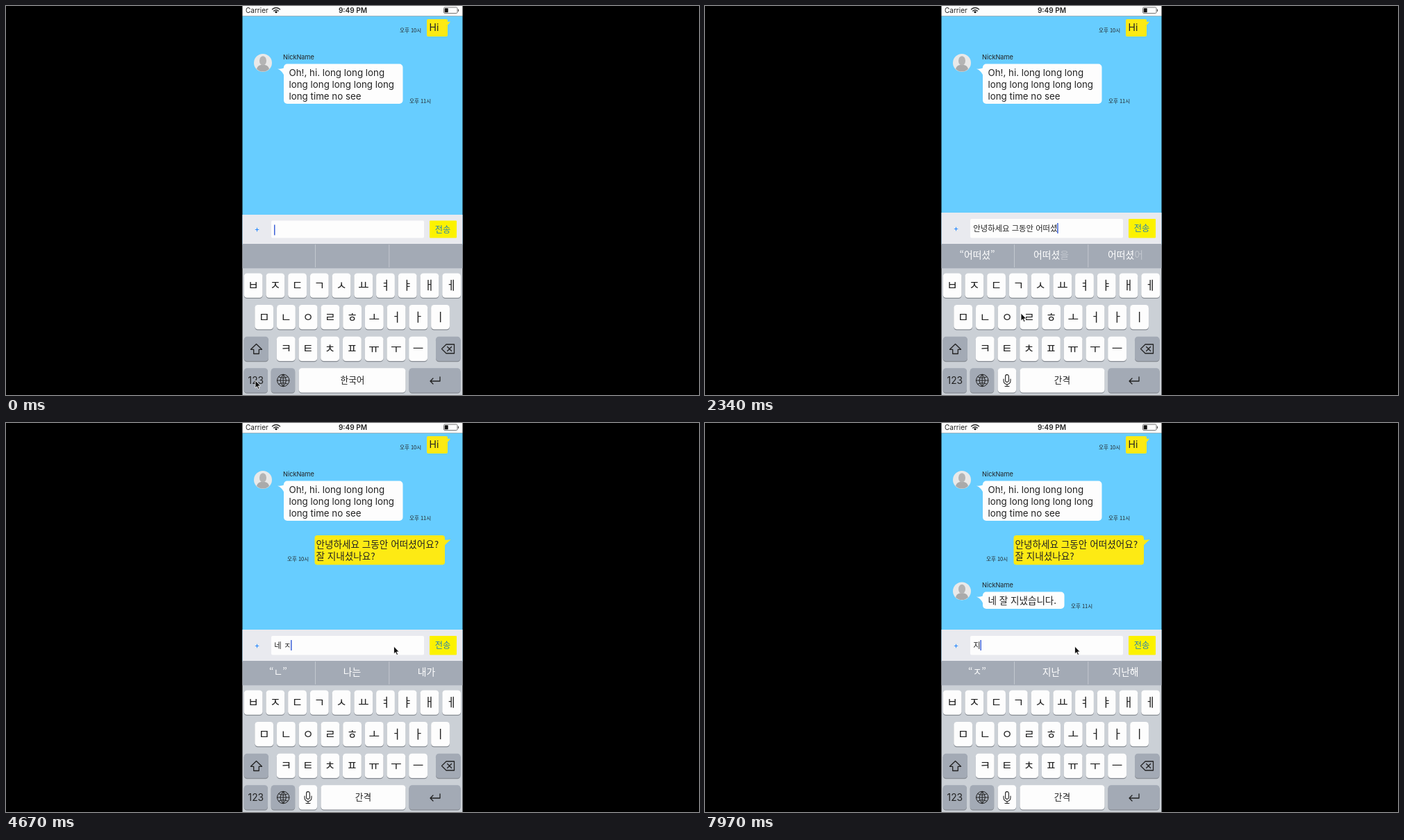
Write an HTML page that moves like this. It is 998x561 px and loops after 8 s.

```html
<!DOCTYPE html>
<html lang="ko">
<head>
<meta charset="utf-8">
<title>Chat</title>
<style>
  html, body { margin: 0; width: 100%; height: 100%; overflow: hidden; background: #000; }
  svg { display: block; width: 998px; height: 561px; }
  text { font-family: Inter, 'Noto Sans CJK KR', 'Noto Sans CJK', sans-serif; white-space: pre; fill: #222; }
  .ko { font-family: 'Noto Sans CJK KR', 'Noto Sans CJK', 'Noto Sans CJK SC', sans-serif; }
  .mid { text-anchor: middle; }
  .line { fill: none; stroke: #222; stroke-width: 1.3; stroke-linejoin: round; stroke-linecap: round; }
</style>
</head>
<body>
<svg id="stage" viewBox="0 0 998 561"></svg>
<script>
const LOOP = 8000;
const WHITE = '#fdfdfd', YELLOW = '#fdea14', DARK_KEY = '#a3aab5';
const stage = document.getElementById('stage');

// Markup helpers
const rect = (x, y, w, h, fill, r = 0, extra = '') =>
  `<rect x="${x}" y="${y}" width="${w}" height="${h}" rx="${r}" fill="${fill}" ${extra}/>`;
const label = (x, y, size, str, cls = '', extra = '') =>
  `<text x="${x}" y="${y}" font-size="${size}" class="${cls}" ${extra}>${str}</text>`;
const path = (d, extra = '') => `<path d="${d}" ${extra}/>`;
const line = (d, extra = '') => path(d, `class="line" ${extra}`);
const key = (x, y, w, fill = WHITE, id = '') =>
  rect(x, y + 1, w, 35.5, '#878c93', 4.5, id && `id="${id}Shadow"`) +
  rect(x, y, w, 35.3, fill, 4.5, id && `id="${id}"`);
const keyRow = (chars, x, y) => [...chars].map((c, i) =>
  key(x + i * 31.73, y, 26.8) + label(x + i * 31.73 + 13.4, y + 23.5, 17, c, 'ko mid')).join('');

const avatar = y => `<g transform="translate(370 ${y})">
  <circle r="13" fill="#e9e9e9"/>
  <path d="M-9 9Q-8 4-3 3L3 3Q8 4 9 9A13 13 0 0 1-9 9Z" fill="#aaa"/>
  <ellipse cy="-3" rx="5" ry="6.8" fill="#b4b4b4"/></g>`;
const whiteBubble = (y, w, h) => rect(400, y, w, h, WHITE, 5) +
  path(`M391 ${y + 7}Q396 ${y + 8} 401 ${y + 5.5}V${y + 18}Q398 ${y + 10} 391 ${y + 7}Z`, `fill="${WHITE}"`);
const sender = y => avatar(y) + label(399, y - 5.5, 9.2, 'NickName');

const statusBar = rect(340.5, 0, 317, 14.5, WHITE) +
  label(345, 10, 10, 'Carrier') +
  label(499.5, 10, 10.1, '9:49 PM', 'mid', 'font-weight="600"') +
  line('M383.5 4.8Q389 .2 394.5 4.8M385.7 7.1Q389 4.4 392.3 7.1', 'stroke-width="1.8"') +
  path('M386.9 8.4Q389 6.8 391.1 8.4L389 10.6Z') +
  rect(630.5, 2, 19.5, 8.5, 'none', 1.5, 'stroke="#555" stroke-width=".8"') +
  rect(631.7, 3.2, 5, 6.1, '#111', .5) + rect(650.9, 4.7, 1.2, 3.2, '#555');

const chat = rect(340.5, 14.5, 317, 330, '#67cdff') +
  rect(606, 19, 30, 25, YELLOW, 2) + path('M635 23L640 22.5Q638 26 635 28Z', `fill="${YELLOW}"`) +
  label(609.5, 36.3, 14, 'Hi') + label(567, 37.8, 7.5, '오후 10시', 'ko') +
  sender(82) + whiteBubble(83.5, 171.5, 57.5) +
  ['Oh!, hi. long long long', 'long long long long long', 'long time no see']
    .map((s, i) => label(407.5, 100.8 + i * 17.2, 13.35, s)).join('') +
  label(581, 140.3, 7.5, '오후 11시', 'ko') +
  `<g id="sentBubble">${rect(444.5, 162, 187.5, 42.5, YELLOW, 4)}
    ${path('M631 168.5Q636 169 640.5 168Q636 172 631 177Z', `fill="${YELLOW}"`)}
    ${label(446.5, 179.5, 13.6, '안녕하세요 그동안 어떠셨어요?', 'ko')}
    ${label(446.5, 196.7, 13.6, '잘 지내셨나요?', 'ko')}
    ${label(405, 198.7, 7.5, '오후 10시', 'ko')}</g>
  <g id="replyBubble">${sender(242.5)}${whiteBubble(243.5, 117.5, 24.5)}
    ${label(407.5, 260.5, 13.55, '네 잘 지냈습니다.', 'ko')}
    ${label(527, 266.7, 7.5, '오후 11시', 'ko')}</g>`;

const inputBar = rect(340.5, 298, 317, 46, '#e9eaef', 0, 'id="panel"') +
  rect(382, 307, 220, 27.5, WHITE, 2, 'id="field"') +
  rect(610, 307, 39, 27.5, '#fcf200', 1, 'id="send"') +
  label(361.5, 325, 11.5, '+', 'mid', 'id="plus" style="fill:#1680ff"') +
  label(629, 325, 12.2, '전송', 'ko mid', 'id="sendLabel" style="fill:#247fb4"') +
  label(386.3, 0, 11.35, '', 'ko', 'id="line0"') + label(386.3, 0, 11.35, '', 'ko', 'id="line1"') +
  rect(386, 0, 1.5, 15, '#3e62d8', 0, 'id="caret"');

const keyboard = rect(340.5, 343, 317, 218, '#cbd0d6') + rect(340.5, 343, 317, 35.3, DARK_KEY) +
  rect(445, 344, 1, 33, '#c3c8cf') + rect(551.3, 344, 1, 33, '#c3c8cf') +
  [392, 498.5, 605.5].map((x, i) => label(x, 364, 13.8, '', 'ko mid', `id="hint${i}" style="fill:#fff"`)).join('') +
  keyRow('ㅂㅈㄷㄱㅅㅛㅕㅑㅐㅔ', 342.7, 385.5) +
  keyRow('ㅁㄴㅇㄹㅎㅗㅓㅏㅣ', 358.3, 431) +
  keyRow('ㅋㅌㅊㅍㅠㅜㅡ', 389.8, 476.7) +
  key(342.7, 476.7, 35.3, DARK_KEY) + line('M360.5 487.5L368.5 495.3H364.3V501.5H356.7V495.3H352.5Z') +
  key(619, 476.7, 35.5, DARK_KEY) +
  line('M634 488H645.5V501H634L627.5 494.5ZM635.6 491.5L641.6 497.5M641.6 491.5L635.6 497.5') +
  key(342.7, 522.3, 34.3, DARK_KEY) + label(359.8, 545.3, 13.8, '123', 'mid') +
  key(381.7, 522.3, 34.5, DARK_KEY) +
  line('M390.5 540A8.7 8.7 0 1 1 407.9 540A8.7 8.7 0 1 1 390.5 540ZM399.2 531.3V548.7M390.5 540H407.9' +
    'M399.2 531.3Q390.7 540 399.2 548.7Q407.7 540 399.2 531.3M392.7 534.8Q399.2 538 405.7 534.8M392.7 545.2Q399.2 542 405.7 545.2',
    'style="stroke-width:1"') +
  `<g id="mic">${key(421.7, 522.3, 26.5)}
    ${line('M432.6 534A2.4 2.4 0 0 1 437.4 534V540A2.4 2.4 0 0 1 432.6 540ZM430 538V540.5A5 5 0 0 0 440 540.5V538M435 545.5V548.5M432 548.5H438', 'style="stroke-width:1.1"')}</g>` +
  key(453.5, 522.3, 122, WHITE, 'space') +
  label(499, 544, 12.7, '한국어', 'ko mid', 'id="language"') +
  label(514.5, 544, 12.7, '간격', 'ko mid', 'id="spaceLabel"') +
  key(580.5, 522.3, 74, DARK_KEY) + line('M625 535V541H611M615 537L611 541L615 545');

const pointer = path('M0 0V11L2.5 8.7L4.2 12.6L6 11.8L4.3 8H7.7Z',
  'id="pointer" fill="#111" stroke="#fff" stroke-width=".8"');

stage.innerHTML = rect(0, 0, 998, 561, '#000') + chat + statusBar + inputBar + keyboard + pointer;
const el = {};
stage.querySelectorAll('[id]').forEach(node => el[node.id] = node);

// Every intermediate string seen while a Hangul text is typed jamo by jamo
const CHO = 'ㄱㄲㄴㄷㄸㄹㅁㅂㅃㅅㅆㅇㅈㅉㅊㅋㅌㅍㅎ';
const JONG = ' ㄱㄲㄳㄴㄵㄶㄷㄹㄺㄻㄼㄽㄾㄿㅀㅁㅂㅄㅅㅆㅇㅈㅊㅋㅌㅍㅎ';
const isSyllable = code => code >= 0 && code < 11172;
function typingStates(str) {
  const states = [''];
  let done = '';
  for (const ch of str) {
    const code = ch.charCodeAt(0) - 0xac00;
    if (isSyllable(code)) {
      const cho = CHO[Math.floor(code / 588)];
      const last = done ? done.charCodeAt(done.length - 1) - 0xac00 : -1;
      const tail = JONG.indexOf(cho);
      const joins = isSyllable(last) && last % 28 === 0 && tail > 0;
      states.push(joins ? done.slice(0, -1) + String.fromCharCode(0xac00 + last + tail) : done + cho);
      states.push(done + String.fromCharCode(0xac00 + code - code % 28));
      if (code % 28) states.push(done + ch);
    } else states.push(done + ch);
    done += ch;
  }
  return states;
}

const SEND_TIMES = [4200, 6540];
const FIRST_LINE = '안녕하세요 그동안 어떠셨어요?\n';
const typing = [
  { start: 755, pace: 53, prefix: '', text: FIRST_LINE },
  { start: 3120, pace: 53, prefix: FIRST_LINE, text: '잘 지내셨나요?' },
  { start: SEND_TIMES[0], pace: 1, prefix: '', text: '' },
  { start: 4400, pace: 65, prefix: '', text: '네 잘 지냈습니다.' },
  { start: SEND_TIMES[1], pace: 1, prefix: '', text: '' },
  { start: 7840, pace: 53, prefix: '', text: '지' }
].map(run => ({ ...run, states: typingStates(run.text) }));

// Word suggestions; the part after "|" is faint
const NEXT = '하지만,그러나,그는';
const hints = [
  [0, ',,'], [350, NEXT], [850, '“ㅇ”,이,있다'], [890, '“아”,앞서,아울러'], [1000, '“안”,안에,안전'],
  [1130, '“안녕”,안녕하세요,안녕히'], [1450, '“안녕하세요”,안녕하세요,안녕하십니까'],
  [1500, NEXT], [1580, '“그”,그는,그리고'], [1720, '“그동”,그동안,그동안의'],
  [1880, '“그동안”,그동안,그동안의'], [1980, NEXT], [2070, '“어”,어떤,어떻게'],
  [2200, '“어떠”,어떠한,어떠냐'], [2310, '“어떠셨”,어떠셨|을,어떠셨|어'],
  [2480, '“어떠셨어”,어떠셨어,어떠셨어요'], [2640, NEXT], [3250, '“잘”,잘,잘못'],
  [3400, '“지”,지난,지난해'], [3540, '“지내”,지내는,지내고'], [3700, '“지내셨”,지내셨,지내셨던'],
  [3900, '“지내셨나요”,지내셨나요,지내셨나'], [4020, NEXT], [4590, '“ㄴ”,나는,내가'],
  [4720, NEXT], [4830, '“잘”,잘,잘못'], [4960, '“지”,지난,지난해'],
  [5150, '“지냈”,지냈다,지냈던'], [5400, '“지냈습”,지냈습니다,지냈습니까'],
  [5650, '“지냈습니다”,지냈습니다,지냈습니다만'], [5760, NEXT], [7925, '“ㅈ”,지난,지난해']
];

// time, x, y of the pointer tip
const pointerPath = [
  [0, 359, 540], [120, 359, 540], [620, 455, 443], [3780, 455, 443], [4100, 628, 321], [4300, 628, 321],
  [4560, 558.5, 322], [5900, 558.5, 322], [6300, 628, 321], [6900, 628, 321], [7350, 532.5, 322]
];

const progress = (t, from, to) => Math.min(1, Math.max(0, (t - from) / (to - from)));
const ease = p => p * p * (3 - 2 * p);
const set = (node, attrs) => { for (const name in attrs) node.setAttribute(name, attrs[name]); };

function inputAt(t) {
  const run = typing.filter(r => r.start <= t).pop();
  if (!run) return { text: '', idle: t };
  const end = run.states.length - 1;
  const step = Math.min(end, Math.floor((t - run.start) / run.pace));
  return { text: run.prefix + run.states[step], idle: t - run.start - step * run.pace };
}

function drawInput(t) {
  const { text, idle } = inputAt(t);
  const lines = text.split('\n');
  const fresh = t < 800;
  const panelTop = lines.length > 1 ? 284 : fresh ? 301 : 298;
  const top = lines.length > 1 ? 292.5 : fresh ? 309.5 : 307;
  const middle = (top + 334.5) / 2;
  set(el.panel, { y: panelTop, height: 343 - panelTop });
  for (const box of [el.field, el.send]) set(box, { y: top, height: 334.5 - top });
  set(el.plus, { y: middle + 4.2 });
  set(el.sendLabel, { y: middle + 4.5 });

  const row = lines.length - 1;
  [el.line0, el.line1].forEach((node, i) => {
    node.textContent = lines[i] || '';
    set(node, { y: top + 18 + i * 14 });
  });
  const width = lines[row] ? el['line' + row].getComputedTextLength() : 0;
  set(el.caret, { x: 386 + width, y: top + 6 + row * 14, opacity: idle % 600 < 330 ? 1 : 0 });

  const pressed = SEND_TIMES.some(s => t > s - 80 && t < s + 150);
  set(el.sendLabel, { opacity: pressed ? .5 : 1 });
}

function drawHints(t) {
  const words = hints.filter(h => h[0] <= t).pop()[1].split(',');
  words.forEach((word, i) => {
    const [solid, faint] = word.split('|');
    el['hint' + i].innerHTML = solid + (faint ? `<tspan fill-opacity=".35">${faint}</tspan>` : '');
  });
}

function drawSpaceKey(t) {
  const p = ease(progress(t, 400, 600));
  const x = 421.7 + 31.8 * p;
  for (const node of [el.space, el.spaceShadow]) set(node, { x, width: 575.5 - x });
  set(el.mic, { opacity: p });
  set(el.language, { opacity: 1 - p });
  set(el.spaceLabel, { opacity: p });
}

function drawPointer(t) {
  const i = pointerPath.findLastIndex(p => p[0] <= t);
  const [t0, x0, y0] = pointerPath[i];
  const [t1, x1, y1] = pointerPath[i + 1] || [LOOP, x0, y0];
  const p = ease(progress(t, t0, t1));
  set(el.pointer, { transform: `translate(${x0 + (x1 - x0) * p} ${y0 + (y1 - y0) * p})` });
}

function draw(t) {
  drawInput(t);
  drawHints(t);
  drawSpaceKey(t);
  drawPointer(t);
  set(el.sentBubble, { opacity: t >= SEND_TIMES[0] ? 1 : 0 });
  set(el.replyBubble, { opacity: t >= SEND_TIMES[1] ? 1 : 0 });
}

const began = performance.now();
function frame() {
  draw((performance.now() - began) % LOOP);
  requestAnimationFrame(frame);
}
frame();
</script>
</body>
</html>
```
